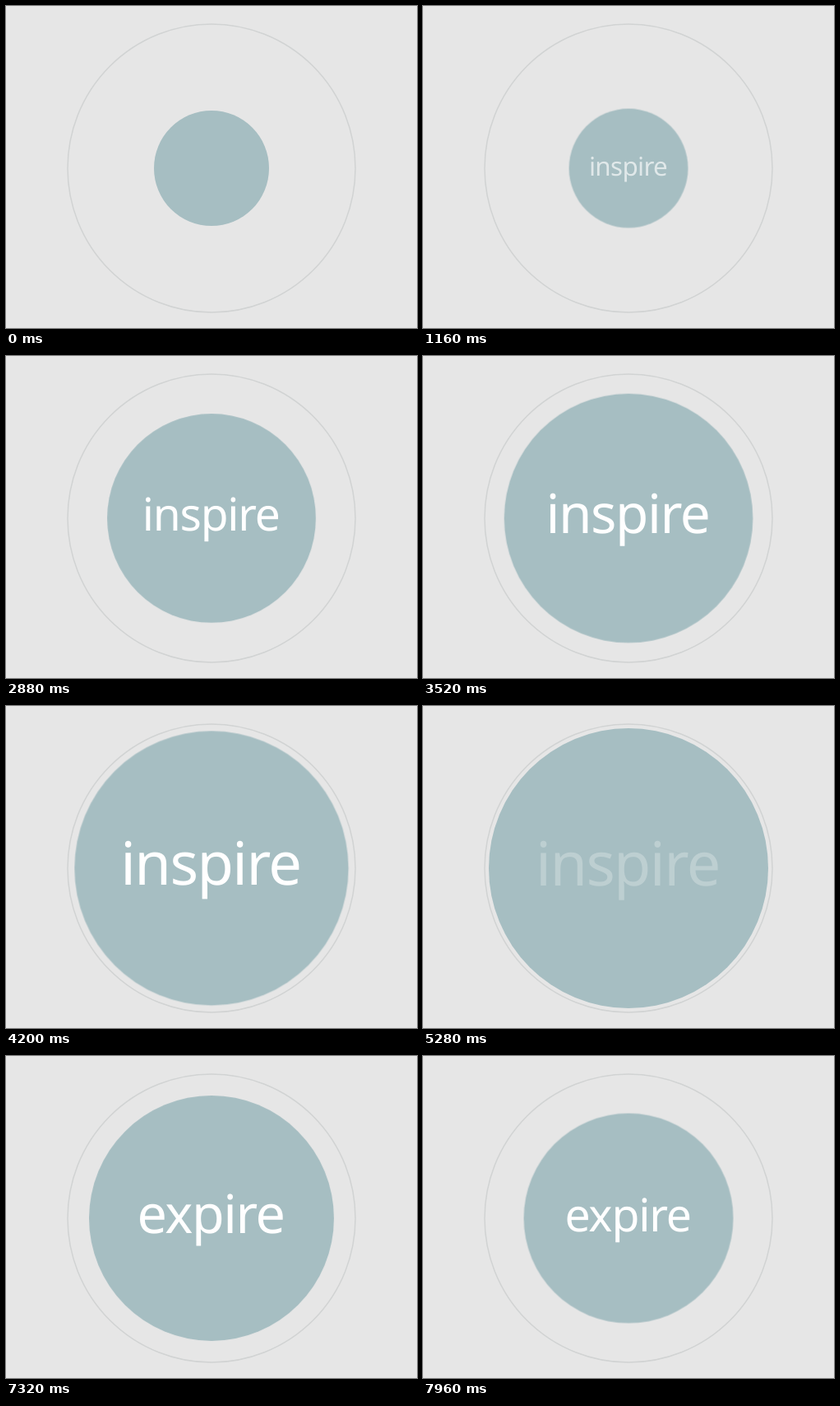
An HTML page that plays this animation: 500 px wide and 391 px high, repeating every 8000 ms.

```html
<!DOCTYPE html>
<html lang="en">
<head>
<meta charset="utf-8">
<title>Breathing circle</title>
<style>
  html, body { margin: 0; width: 100%; height: 100%; overflow: hidden; background: #e6e6e6; }
  svg { display: block; width: 100%; height: 100%; }
  .ring { fill: none; stroke: #d1d3d3; stroke-width: 1.5; }
  .disc { fill: #a6bec2; }
  #breath { transform-origin: 0 0; }
  text {
    font: 43.4px "Noto Sans", "Open Sans", sans-serif;
    letter-spacing: -0.022em;
    text-anchor: middle;
    text-rendering: geometricPrecision;
    fill: #fff;
    opacity: 0;
  }
</style>
</head>
<body>
<svg viewBox="0 0 500 391">
  <g transform="translate(250 197)">
    <circle class="ring" r="175"/>
    <g id="breath">
      <circle class="disc" r="100"/>
      <text id="inhale" x="-0.7" y="12.2">inspire</text>
      <text id="exhale" x="-0.7" y="12.2">expire</text>
    </g>
  </g>
</svg>
<script>
  const LOOP = 8000;
  const SPAN = 10460; // the exhale is cut off by the loop

  // Steps are [time in ms, value, easing towards the next step].
  function track(id, property, steps, format = String) {
    const frames = steps.map(([time, value, easing = "linear"]) => ({
      offset: time / SPAN, [property]: format(value), easing
    }));
    const animation = document.getElementById(id).animate(frames, { duration: SPAN, fill: "both" });
    animation.pause();
    return animation;
  }

  const tracks = [
    track("breath", "transform", [
      [0, 70], [720, 70, "ease-in-out"], [4720, 170],
      [5860, 170, "ease-in-out"], [SPAN, 70]
    ], radius => `scale(${radius / 100})`),
    track("inhale", "opacity", [
      [0, 0], [720, 0], [1400, 1], [4720, 1], [5480, 0], [SPAN, 0]
    ]),
    track("exhale", "opacity", [
      [0, 0], [5700, 0], [6350, 1], [SPAN, 1]
    ])
  ];

  const start = performance.now();
  function draw() {
    const time = (performance.now() - start) % LOOP;
    for (const animation of tracks) animation.currentTime = time;
    requestAnimationFrame(draw);
  }
  draw();
</script>
</body>
</html>
```
